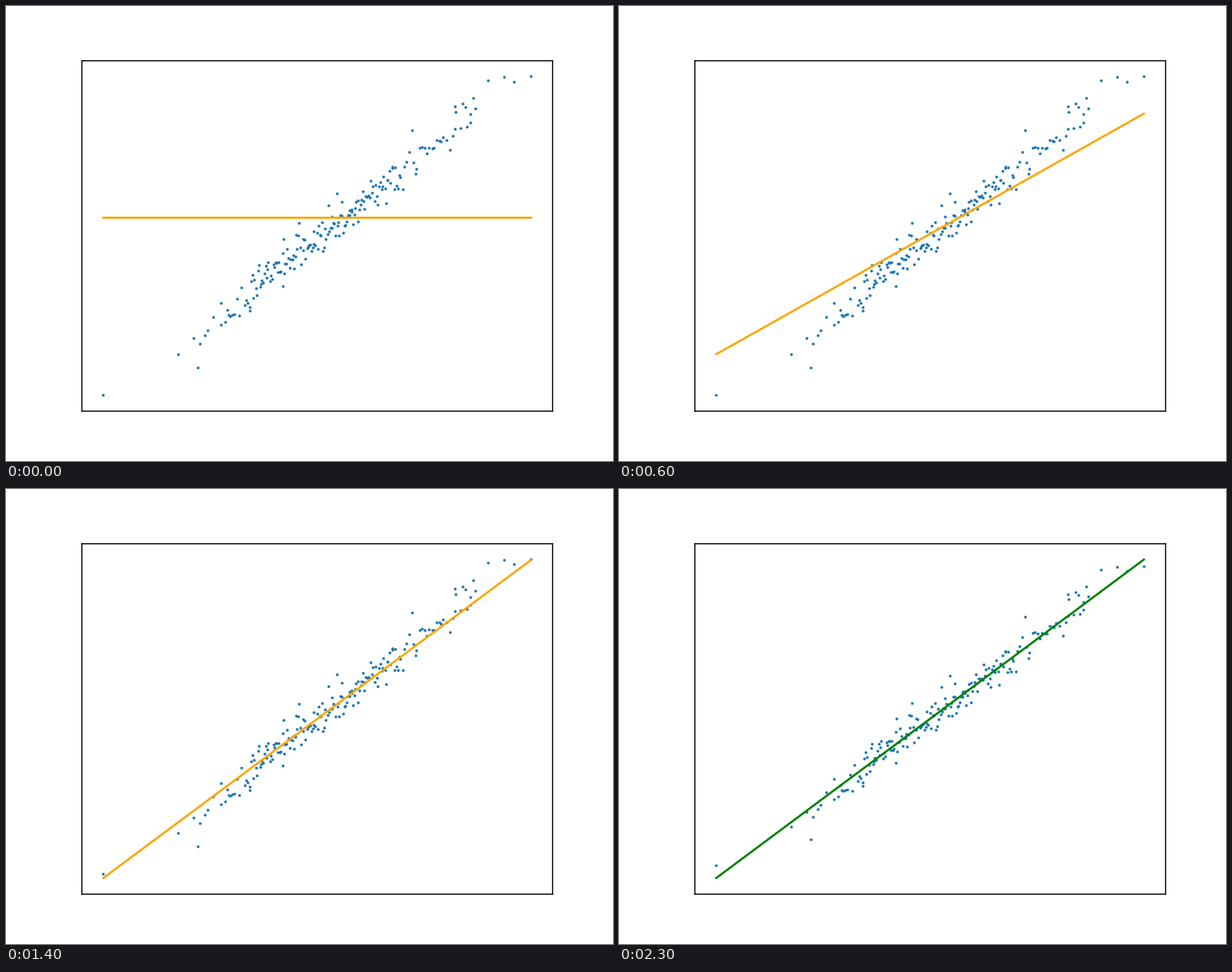
Recreate the animation shown at these times as a matplotlib script. Size 864x648 px, loop 2.5 s.

```python
import numpy as np
import matplotlib.pyplot as plt
from matplotlib.animation import FuncAnimation

STEPS = 23
X_MIN, X_MAX = 138.4, 747.2

# Lone points, in stage pixels (y grows downwards).
OUTLIERS = [(X_MIN, 554), (244.5, 496), (272.5, 515), (395, 332),
            (471, 266.5), (578, 177), (639.5, 142.5), (686, 105.5),
            (709.5, 101), (723, 107.5), (X_MAX, 100.4)]


def approach(start, end, rate, n):
    """Value after n descent steps; the gap shrinks by `rate` each step."""
    return end + (start - end) * rate ** n


def line_ends(n):
    left = approach(301.4, 576, 0.44 ** 0.25, n)
    right = approach(301.4, 87.6, 0.455 ** 0.25, n)
    return left, right


def make_cloud():
    rng = np.random.default_rng(7)
    count = 188
    # Even ranks mapped through a rough cumulative distribution of x.
    rank = (np.arange(count) + rng.uniform(0, 1, count)) / count
    x = np.interp(rank, [0, 0.03, 0.1, 0.27, 0.67, 0.83, 0.89, 1],
                  [262, 305, 345, 395, 510, 560, 598, 672])
    fit = np.interp(x, [X_MIN, X_MAX], line_ends(np.inf))
    y = fit + rng.normal(0, 13.5, count)
    return np.vstack([OUTLIERS, np.column_stack([x, y])])


cloud = make_cloud()
y_low, y_high = cloud[:, 1].max(), cloud[:, 1].min()

fig, ax = plt.subplots(figsize=(6, 4.5), dpi=144)
ax.set_xticks([])
ax.set_yticks([])
ax.plot(cloud[:, 0], cloud[:, 1], "o", ms=1, color="tab:blue")
line, = ax.plot([X_MIN, X_MAX], line_ends(0), color="orange")


def update(frame):
    n = min(frame, STEPS)
    left, right = line_ends(n)
    line.set_ydata([left, right])
    line.set_color("green" if n == STEPS else "orange")
    # The view always holds the cloud and the line, plus a 5 % margin.
    low, high = max(y_low, left), min(y_high, right)
    pad = 0.05 * (low - high)
    ax.set_ylim(low + pad, high - pad)
    return line,


anim = FuncAnimation(fig, update, frames=25, interval=100, repeat=True,
                     repeat_delay=0, blit=False)
plt.show()
```
